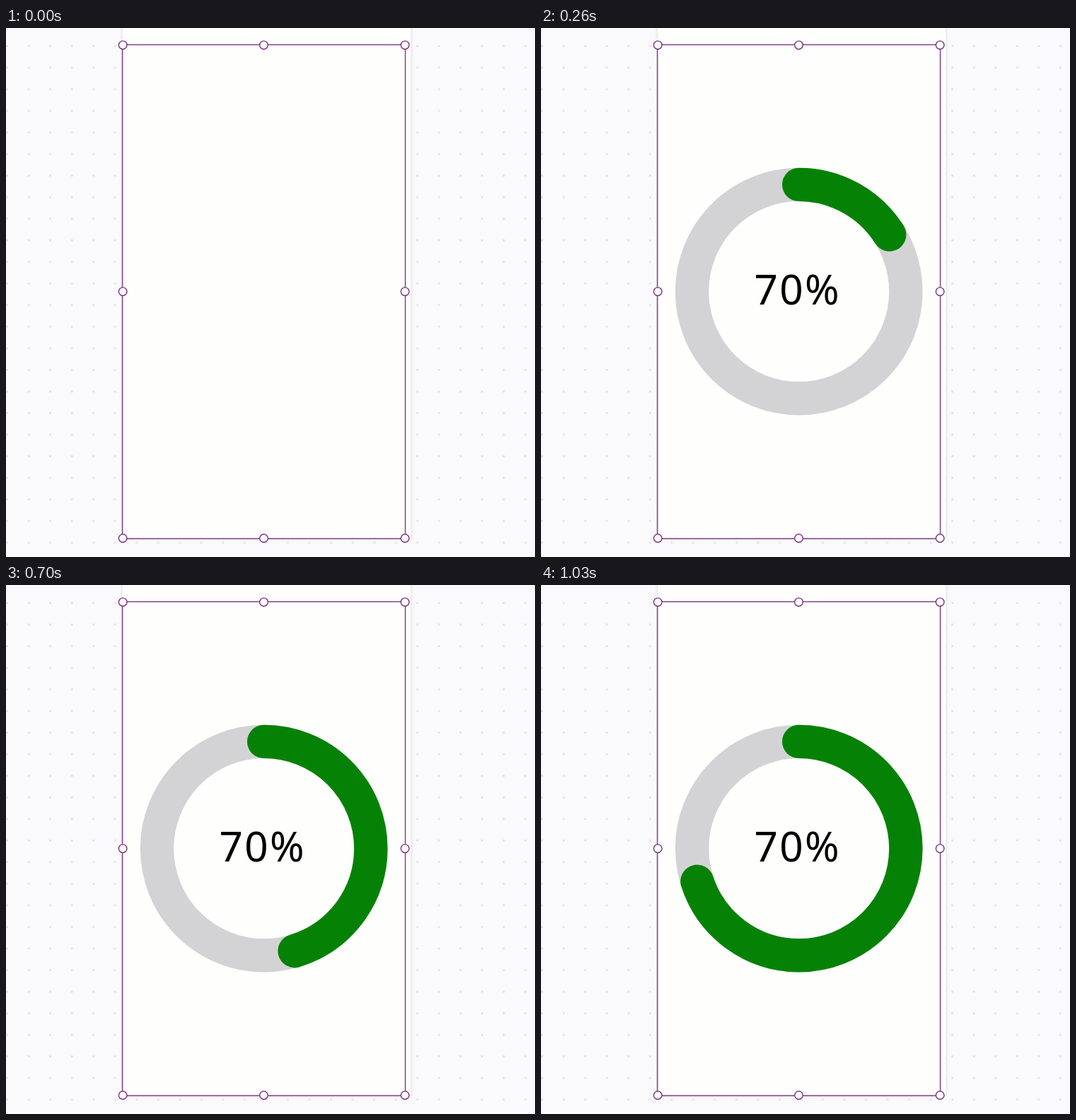
Write an HTML page that moves like this. It is 748x748 px and loops after 4560 ms.

```html
<!DOCTYPE html>
<html lang="en">
<head>
<meta charset="utf-8">
<title>Progress ring</title>
<style>
  html, body { margin: 0; width: 100%; height: 100%; overflow: hidden; background: #fafafd; }
  svg { display: block; width: 100%; height: 100%; }
  .page { fill: #fefefd; filter: drop-shadow(0 0 2px rgba(0, 0, 0, .16)); }
  .frame { fill: none; stroke: #853f88; stroke-width: 1.5; }
  .handle { fill: #fff; stroke: #7c3080; stroke-width: 1.4; }
  .ring { fill: none; stroke-width: 47.4; }
  .track { stroke: #d3d3d5; }
  .bar { stroke: #058205; stroke-linecap: round; }
  text { font: 58.5px "Noto Sans", "Open Sans", sans-serif; letter-spacing: 2.3px; fill: #000; }
</style>
</head>
<body>
<svg viewBox="0 0 748 748">
  <defs>
    <pattern id="dots" x="-13.75" y="10.25" width="30.53" height="30.53" patternUnits="userSpaceOnUse">
      <rect x="13.85" y="13.75" width="3" height="3" rx=".8" fill="#e3e3e8"/>
    </pattern>
  </defs>
  <rect width="748" height="748" fill="#fafafd"/>
  <rect width="748" height="748" fill="url(#dots)"/>
  <rect class="page" x="165" y="-20" width="407.5" height="742"/>
  <g id="gauge" visibility="hidden">
    <circle class="ring track" cx="364.7" cy="372.6" r="151.2"/>
    <circle class="ring bar" id="bar" cx="364.7" cy="372.6" r="151.2" pathLength="360"
            transform="rotate(-90 364.7 372.6)" stroke-dasharray="0 720"/>
    <text x="301.5" y="391">70%</text>
  </g>
  <rect class="frame" x="164.6" y="23.6" width="400" height="698.4"/>
  <g id="handles"></g>
</svg>
<script>
  const LOOP = 4560;
  const TICK = 100 / 3;
  // [tick, swept degrees]
  const SWEEP = [[1, 0], [5, 33.1], [11, 82.6], [17, 131.9], [21, 163.3], [27, 217.1], [31, 252]];

  const gauge = document.getElementById('gauge');
  const bar = document.getElementById('bar');
  const handles = document.getElementById('handles');

  const xs = [165.2, 364.5, 564.2];
  const ys = [24.2, 372.7, 721.5];
  ys.forEach((y, row) => xs.forEach((x, col) => {
    if (row === 1 && col === 1) return;
    const dot = document.createElementNS('http://www.w3.org/2000/svg', 'circle');
    dot.setAttribute('class', 'handle');
    dot.setAttribute('cx', x);
    dot.setAttribute('cy', y);
    dot.setAttribute('r', 5.8);
    handles.append(dot);
  }));

  // Ticks start on the 10 ms grid, rounded down.
  function tickAt(ms) {
    let tick = 0;
    while (tick < 31 && Math.floor((tick + 1) * TICK / 10 + 1e-6) * 10 <= ms) tick++;
    return tick;
  }

  function angleAt(tick) {
    const i = SWEEP.findIndex(([end]) => tick <= end);
    if (i <= 0) return 0;
    const [t0, a0] = SWEEP[i - 1];
    const [t1, a1] = SWEEP[i];
    return a0 + (a1 - a0) * (tick - t0) / (t1 - t0);
  }

  const start = performance.now();

  function draw() {
    const tick = tickAt((performance.now() - start) % LOOP);
    gauge.setAttribute('visibility', tick ? 'visible' : 'hidden');
    bar.setAttribute('stroke-dasharray', `${angleAt(tick)} 720`);
    requestAnimationFrame(draw);
  }
  draw();
</script>
</body>
</html>
```
